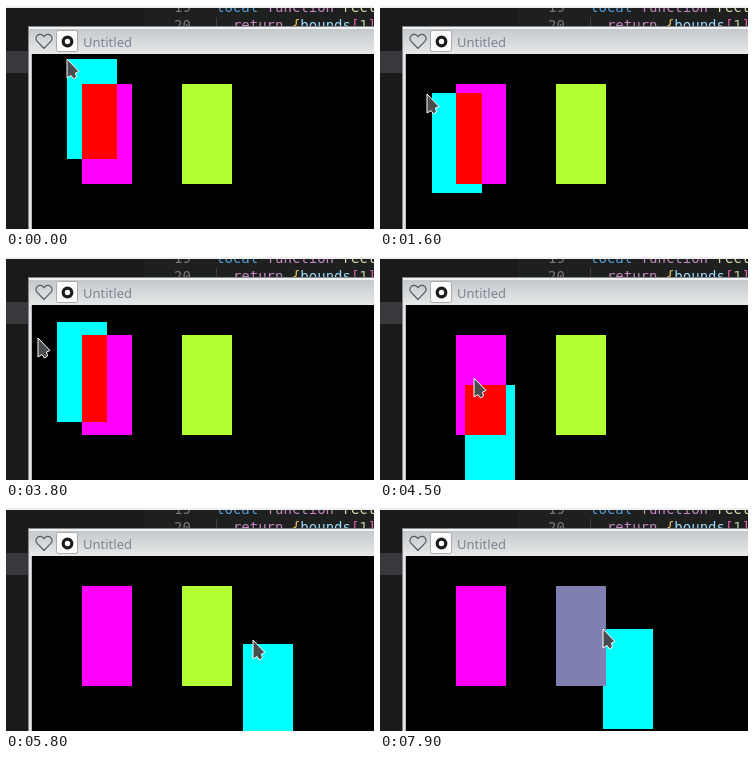
Write an HTML page that moves like this. It is 368 by 223 pixels and loops after 8000 ms.

```html
<!DOCTYPE html>
<html lang="en">
<head>
<meta charset="utf-8">
<title>Overlapping rectangles</title>
<style>
  html, body { margin: 0; width: 100%; height: 100%; overflow: hidden; background: #1e1e1e; }
  svg { display: block; width: 368px; height: 223px; }
  .code { font: 14px "DejaVu Sans Mono", monospace; white-space: pre; }
  .title { font: 13px "Noto Sans", sans-serif; fill: #7b8492; }
  .num { fill: #767876; }
  .key { fill: #569cd6; }
  .flow { fill: #c586c0; }
  .fn { fill: #dcdcaa; }
  .var { fill: #9cdcfe; }
  .brace { fill: #e8c05a; }
  .bracket { fill: #da5fb0; }
  .lit { fill: #b5cea8; }
</style>
</head>
<body>
<svg viewBox="0 0 368 223" shape-rendering="crispEdges">
  <defs>
    <linearGradient id="bar" x1="0" y1="0" x2="0" y2="1">
      <stop offset="0" stop-color="#c6c9cc"/>
      <stop offset="1" stop-color="#e6e8e9"/>
    </linearGradient>
    <clipPath id="view"><rect x="26" y="48" width="342" height="175"/></clipPath>
  </defs>

  <!-- editor behind the window -->
  <rect width="368" height="223" fill="#1a1a1a"/>
  <rect x="138" width="230" height="21" fill="#1e201f"/>
  <rect y="45" width="22" height="22" fill="#38383d"/>
  <g class="code" shape-rendering="auto">
    <text x="168" y="6" class="num">19</text>
    <text x="210" y="6"><tspan class="key">local</tspan> <tspan class="flow">function</tspan> <tspan class="fn">rect</tspan></text>
    <text x="168" y="24" class="num">20</text>
    <text x="226.9" y="24"><tspan class="flow">return</tspan> <tspan class="brace">{</tspan><tspan class="var">bounds</tspan><tspan class="bracket">[</tspan><tspan class="lit">1</tspan><tspan class="bracket">]</tspan></text>
  </g>
  <rect x="210" y="11" width="1" height="10" fill="#404040"/>
  <rect width="368" height="2" fill="#eef0ef"/>

  <!-- window frame -->
  <rect x="22" y="20" width="346" height="203" fill="#85888b"/>
  <rect x="23" y="21" width="345" height="202" fill="#f0f1f2"/>
  <rect x="23" y="23" width="345" height="25" fill="url(#bar)"/>
  <rect x="23" y="48" width="3" height="175" fill="#e3e5e6"/>
  <rect x="25" y="48" width="1" height="175" fill="#b8bbbe"/>
  <g shape-rendering="auto">
    <path d="M38 42.5 L31 35.2 C27.500 31 33.500 25 38 30.500 C42.500 25 48.500 31 45 35.200 Z" fill="none" stroke="#55595d" stroke-width="1.2"/>
    <rect x="50.500" y="24.500" width="21" height="21" rx="2" fill="#fcfcfc" stroke="#a9acaf"/>
    <circle cx="61.500" cy="35.500" r="4.300" fill="none" stroke="#1c1c1c" stroke-width="3.200"/>
    <text x="77" y="41" class="title">Untitled</text>
  </g>

  <!-- canvas -->
  <rect x="26" y="48" width="342" height="175" fill="#000"/>
  <g clip-path="url(#view)">
    <rect x="76" y="78" width="50" height="100" fill="#f0f"/>
    <rect id="box" width="50" height="100" fill="#0ff"/>
    <rect id="overlap" fill="#f00"/>
    <rect id="target" x="176" y="78" width="50" height="100"/>
  </g>
  <path id="cursor" shape-rendering="auto" d="M0 0 L12 12.500 L8.500 14 L9.500 18 L6.500 20 L4 16.500 L0 19 Z" fill="#4a4d50" stroke="#fff" stroke-linejoin="round"/>
</svg>
<script>
  const STEP = 100, LOOP = 8000, W = 50, H = 100;

  // Turning points of the mouse: [step, x, y]; equal neighbours are rests.
  const path = [
    [0, 61, 53], [7, 61, 53], [11, 110, 128], [13, 126, 94], [16, 52, 87],
    [17, 47, 88], [20, 51, 152], [23, 51, 152], [26, 123, 150], [28, 123, 150],
    [30, 116, 108], [31, 116, 94], [36, 84, 47], [41, 12, 108], [45, 85, 128],
    [46, 94, 121], [49, 94, 89], [52, 82, 116], [54, 108, 136], [58, 237, 136],
    [59, 247, 132], [61, 247, 132], [66, 154, 125], [70, 154, 125],
    [71, 182, 122], [72, 195, 121], [78, 195, 121], [79, 223, 121]
  ];

  const $ = id => document.getElementById(id);
  const setAttrs = (el, attrs) => {
    for (const name in attrs) el.setAttribute(name, attrs[name]);
  };
  const same = (a, b) => a[1] === b[1] && a[2] === b[2];

  // Smooth through turning points, still at both ends of a rest.
  function slope(i, axis) {
    const a = path[i - 1], p = path[i], b = path[i + 1];
    if (!a || !b || same(a, p) || same(p, b)) return 0;
    return (b[axis] - a[axis]) / (b[0] - a[0]);
  }

  function mouseAt(step) {
    const next = path.findIndex(p => p[0] > step);
    if (next < 0) return path[path.length - 1].slice(1);
    const i = next - 1, a = path[i], b = path[next];
    const d = b[0] - a[0], u = (step - a[0]) / d;
    return [1, 2].map(axis => Math.round(
      a[axis] + (b[axis] - a[axis]) * u * u * (3 - 2 * u) +
      d * u * (1 - u) * ((1 - u) * slope(i, axis) - u * slope(next, axis))
    ));
  }

  function draw(step) {
    const [x, y] = mouseAt(step);
    const [cx, cy] = mouseAt(step + 1); // the box trails the pointer by one step
    const left = Math.max(x, 76), top = Math.max(y, 78);
    setAttrs($("box"), { x, y });
    setAttrs($("overlap"), {
      x: left, y: top,
      width: Math.max(0, Math.min(x + W, 126) - left),
      height: Math.max(0, Math.min(y + H, 178) - top)
    });
    const inside = x >= 176 && x <= 226 && y >= 78 && y <= 178;
    $("target").setAttribute("fill", inside ? "#7f7fb2" : "#b2ff33");
    $("cursor").setAttribute("transform", `translate(${cx} ${cy})`);
  }

  let start;
  function tick(now) {
    start ??= now;
    draw(Math.floor(((now - start) % LOOP) / STEP));
    requestAnimationFrame(tick);
  }
  draw(0);
  requestAnimationFrame(tick);
</script>
</body>
</html>
```
